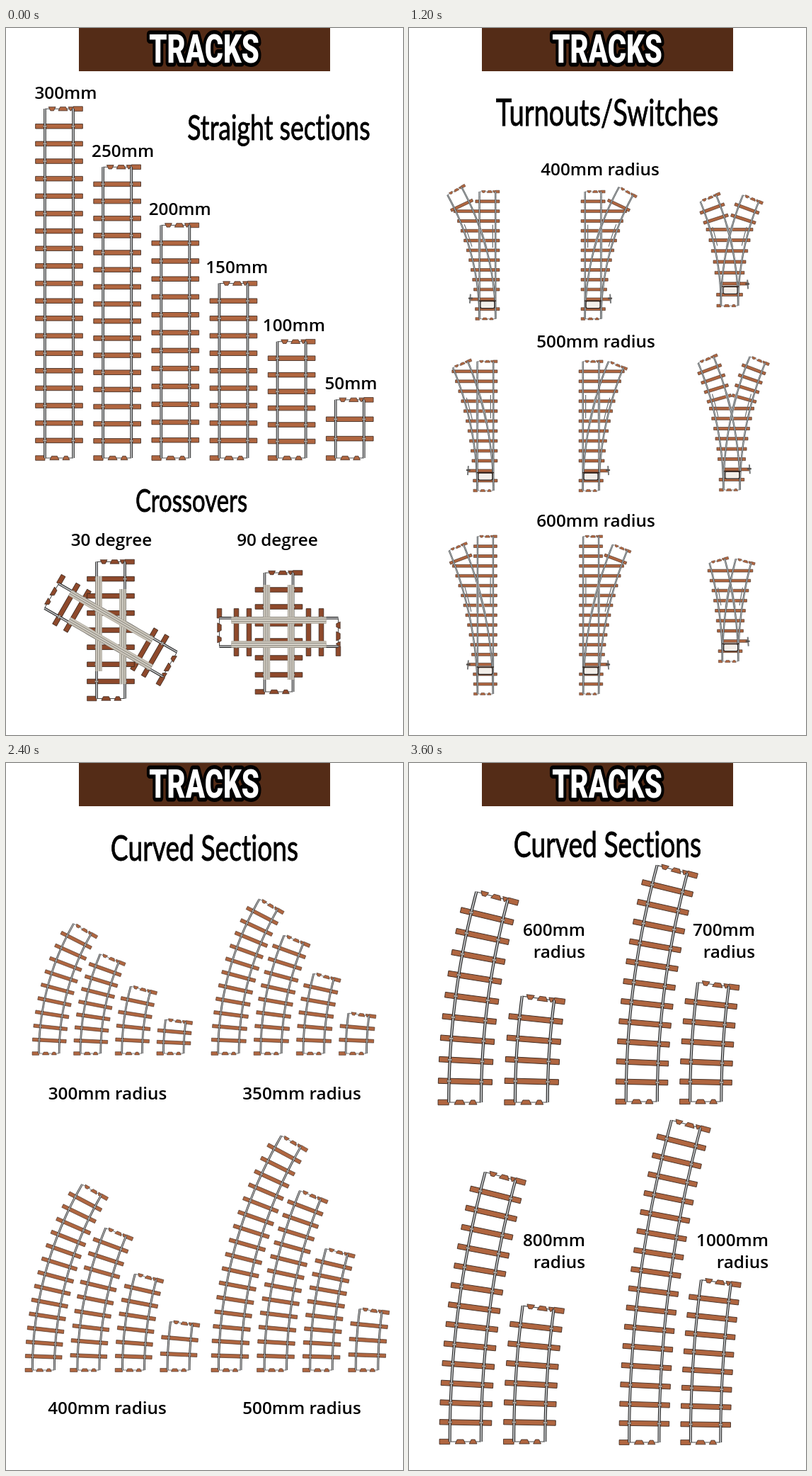
Animation, 561 px wide and 998 px high, one loop 4800 ms. Source, as an HTML page:

```html
<!DOCTYPE html>
<html lang="en">
<head>
<meta charset="utf-8">
<title>Tracks</title>
<style>
html, body { margin: 0; width: 100%; height: 100%; overflow: hidden; background: #fff; }
svg { display: block; width: 100%; height: 100%; }
text { font-variant-ligatures: none; }
.label { font: 600 24.3px "Open Sans", "Noto Sans", sans-serif; }
.head { font-family: Lato, sans-serif; text-anchor: middle; stroke: #000; stroke-width: 0.9px; }
.title { font: 900 55px Roboto, sans-serif; text-anchor: middle; fill: #fff;
  stroke: #000; stroke-width: 11px; stroke-linejoin: round; paint-order: stroke; }
</style>
</head>
<body>
<svg id="stage" viewBox="0 0 561 998" preserveAspectRatio="none"></svg>
<script>
const NS = "http://www.w3.org/2000/svg";
const PAGE_MS = 1200;
const NARROW = 0.73;
// Track sizes in millimetres; "s" below is always pixels per millimetre.
const PITCH = 15, SLEEPER = 20.3, SHORT_SLEEPER = 18.3, RAIL = 12.2, STEP = 50;
const WOOD = "#b06640", DARK_WOOD = "#8e492b";
const stage = document.getElementById("stage");
const rad = degrees => degrees * Math.PI / 180;

function add(parent, tag, attrs, text) {
  const node = document.createElementNS(NS, tag);
  for (const key in attrs) node.setAttribute(key, attrs[key]);
  if (text) node.textContent = text;
  parent.appendChild(node);
  return node;
}

const pts = list => list.map(p => p[0].toFixed(2) + "," + p[1].toFixed(2)).join(" ");

function line(parent, list, color, width) {
  add(parent, "polyline", { points: pts(list), fill: "none", stroke: color, "stroke-width": width });
}

function shape(parent, list, fill, width) {
  add(parent, "polygon", { points: pts(list), fill, stroke: "#39271e", "stroke-width": width });
}

function label(parent, x, y, text, anchor = "middle") {
  add(parent, "text", { x, y, class: "label", "text-anchor": anchor }, text);
}

function heading(parent, x, y, size, text) {
  add(parent, "text", {
    class: "head", "font-size": size, transform: `translate(${x} ${y}) scale(${NARROW} 1)`
  }, text);
}

// A line of the given length that leaves (x, y) upwards and turns evenly.
function route(x, y, length, turn) {
  const at = (d, off, along = 0) => {
    const a = turn * d / length, sin = Math.sin(a), cos = Math.cos(a);
    const px = turn ? x + length / turn * (1 - cos) : x;
    const py = turn ? y - length / turn * sin : y - d;
    return [px + off * cos + along * sin, py + off * sin - along * cos];
  };
  const box = (d, a, b, h) => [at(d, a, h), at(d, b, h), at(d, b, -h), at(d, a, -h)];
  const run = (off, from = 0, to = 1) =>
    Array.from({ length: 25 }, (_, i) => at(length * (from + (to - from) * i / 24), off));
  return { at, box, run, length, turn };
}

function ending(parent, path, top, half, s, fill) {
  const d = top ? path.length : 0, side = top ? 1 : -1, w = 0.45 * s;
  const wedge = (a, b, flip) => {
    const inset = 1.6 * s, h = flip * 1.65 * s;
    shape(parent, [
      path.at(d, a * s, h), path.at(d, b * s, h),
      path.at(d, b * s - inset, -h), path.at(d, a * s + inset, -h)
    ], fill, w);
  };
  line(parent, [path.at(d, -RAIL * s), path.at(d, RAIL * s)], "#4a4a4a", 0.6 * s);
  shape(parent, path.box(d, side * RAIL * s, side * half, 2 * s), fill, w);
  if (top) {
    wedge(-9, -3, 1);
    wedge(-0.6, 7.3, -1);
    wedge(8, 12, 1);
  } else {
    wedge(-8, 0, -1);
    wedge(3, 9, -1);
  }
}

// Sleepers spread evenly, as close to the pitch as fits.
function spread(length, s) {
  const n = Math.round(length / s / PITCH);
  return Array.from({ length: n - 1 }, (_, i) => length * (i + 1) / n);
}

function track(parent, path, s, fill = WOOD, spots = spread(path.length, s)) {
  const half = SLEEPER * s;
  for (const d of spots) shape(parent, path.box(d, -half, half, 2 * s), fill, 0.5 * s);
  for (const top of [false, true]) ending(parent, path, top, half, s, fill);
  for (const off of [-RAIL * s, RAIL * s]) {
    line(parent, path.run(off), "#2c2c2c", 2.25 * s);
    line(parent, path.run(off), "#c4c6c8", s);
    for (const d of spots)
      shape(parent, path.box(d, off - 1.6 * s, off + 1.6 * s, 0.7 * s), "#b9b5af", 0.25 * s);
  }
}

// A family of curves side by side, longest first; x is the left edge.
function curves(parent, x, y, radius, s, angles) {
  angles.forEach((angle, i) => {
    const turn = rad(angle);
    track(parent, route(x + (SLEEPER + i * STEP) * s, y, radius * s * turn, turn), s);
  });
}

function motor(parent, x, y, lever) {
  add(parent, "rect", {
    x: x - 10, y: y + 3, width: 20, height: 10, rx: 2,
    fill: "#f2eee9", stroke: "#2b2523", "stroke-width": 1.3
  });
  line(parent, [[x - 12, y + 2.6], [x + 12, y + 2.6]], "#33231b", 1.5);
  const lx = x + lever * 24;
  line(parent, [[lx, y - 7], [lx + lever, y + 6]], "#77797a", 2);
  line(parent, [[lx - 3, y - 1], [lx + 3, y - 1]], "#4d4a48", 2);
}

// Two routes sharing a toe; sleepers are joined until the routes part.
function turnout(parent, left, right, s, lever, motorTie = 2) {
  const half = SHORT_SLEEPER * s, g = RAIL * s, h = 2.1 * s;
  const main = left.turn ? right : left, both = [left, right];
  spread(main.length, s).forEach((d, i) => {
    const [lx] = left.at(d, 0), [rx] = right.at(d, 0), [, y] = main.at(d, 0);
    if (rx - lx < 2 * half) {
      const shift = i + 1 === motorTie ? lever * 7 : 0;
      const a = lx - half + shift, b = rx + half + shift;
      shape(parent, [[a, y - h], [b, y - h], [b, y + h], [a, y + h]], WOOD, 0.6);
    } else {
      for (const p of both)
        if (d < p.length - 5 * s) shape(parent, p.box(d, -half, half, h), WOOD, 0.6);
    }
  });
  for (const p of both) ending(parent, p, true, half, s, WOOD);
  ending(parent, main, false, half, s, WOOD);

  for (const p of both) {
    const inner = p === left ? g : -g;
    line(parent, p.run(inner, 0.52, 0.72), "#c9cccd", 3.6);
    line(parent, p.run(-inner * 0.66, 0.56, 0.74), "#6d7072", 1.2);
    for (const off of [-g, g]) {
      line(parent, p.run(off), "#4b4e50", 2.4);
      line(parent, p.run(off), "#bcc2c4", 1);
    }
  }
  const [mx, my] = main.at(motorTie * PITCH * s, 0);
  motor(parent, mx, my, lever);
}

function turnoutPair(parent, x, y, radius, angle, straight, s, motorTie) {
  const turn = rad(angle);
  for (const dir of [-1, 1]) {
    const cx = x + dir * 74.6;
    const ahead = route(cx, y, straight * s, 0);
    const branch = route(cx, y, radius * s * turn, dir * turn);
    turnout(parent, ...(dir < 0 ? [branch, ahead] : [ahead, branch]), s, dir, motorTie);
  }
}

function wye(parent, x, y, radius, angle, s) {
  const turn = rad(angle), length = radius * s * turn;
  turnout(parent, route(x, y, length, -turn), route(x, y, length, turn), s, 1);
}

// Cast rails of a crossing, lengthwise on one of its two tracks.
function castings(parent, x, y, shift) {
  for (const side of [-1, 1]) {
    const bar = [-67, 67].map(d => [x + side * 17, y + d + side * shift]);
    line(parent, bar, "#99948a", 9.4);
    line(parent, bar, "#c9c4b9", 8.4);
    line(parent, bar, "#858178", 3.6);
    line(parent, bar, "#d6d2c9", 1.9);
  }
}

function crossing(parent, x, y, length, angle, shift, s) {
  const path = route(x, y + length / 2, length, 0);
  const turned = add(parent, "g", { transform: `rotate(${angle} ${x} ${y})` });
  const nearEnds = [24, 42, length - 42, length - 24];
  track(turned, path, s, DARK_WOOD, nearEnds);
  const upright = add(parent, "g", {});
  track(upright, path, s, DARK_WOOD);
  castings(upright, x, y, shift);
  castings(add(parent, "g", { transform: `rotate(${angle} ${x} ${y})` }), x, y, -shift);
}

function straightPage(p) {
  const s = 1.643;
  heading(p, 385.5, 158, 48.8, "Straight sections");
  for (let i = 0; i < 6; i++) {
    const size = 300 - 50 * i, length = size * s;
    track(p, route(75 + i * STEP * s, 607, length, 0), s);
    label(p, 84.5 + i * 80.6, 592.5 - length, size + "mm");
  }
  heading(p, 262, 683, 45, "Crossovers");
  label(p, 149, 731, "30 degree");
  label(p, 383.5, 731, "90 degree");
  crossing(p, 148, 850, 193, 120, 9, s);
  crossing(p, 385.5, 853, 168, 90, 0, s);
}

function turnoutPage(p) {
  heading(p, 280, 138, 52.3, "Turnouts/Switches");
  label(p, 270, 208, "400mm radius");
  turnoutPair(p, 185.5, 410.5, 400, 29, 193, 0.93);
  wye(p, 453, 392, 400, 22.5, 0.99);
  label(p, 264, 451, "500mm radius");
  turnoutPair(p, 182.5, 653, 500, 22.5, 196, 0.93);
  wye(p, 456, 652, 500, 22.5, 0.96);
  label(p, 264, 704, "600mm radius");
  turnoutPair(p, 182.5, 940, 600, 22.5, 247, 0.9, 3);
  wye(p, 454, 894, 600, 15, 0.913);
}

function tightPage(p) {
  const angles = [30, 22.5, 15, 7.5];
  heading(p, 280.5, 138, 51, "Curved Sections");
  curves(p, 37, 410, 300, 1.173, angles);
  curves(p, 290, 410, 350, 1.203, angles);
  curves(p, 27, 857, 400, 1.272, angles);
  curves(p, 290, 857, 500, 1.292, angles);
  label(p, 143.5, 475, "300mm radius");
  label(p, 418, 475, "350mm radius");
  label(p, 143, 919, "400mm radius");
  label(p, 418, 919, "500mm radius");
}

function widePage(p) {
  const angles = [15, 7.5];
  heading(p, 280.5, 133, 51, "Curved Sections");
  const family = (x, y, radius, s, lx, ly) => {
    curves(p, x, y, radius, s, angles);
    label(p, lx, ly, radius + "mm", "end");
    label(p, lx, ly + 31, "radius", "end");
  };
  family(41, 479, 600, 1.876, 249, 244);
  family(292, 478, 700, 1.81, 489, 244);
  family(43, 958, 800, 1.81, 249, 682);
  family(297, 959, 1000, 1.736, 508, 682);
}

add(stage, "rect", { width: 561, height: 998, fill: "#fff" });
add(stage, "rect", { x: 103, y: 0, width: 355, height: 61, fill: "#542c17" });
add(stage, "text", { class: "title", transform: `translate(280 49) scale(${NARROW} 1)` }, "TRACKS");

const pages = [straightPage, turnoutPage, tightPage, widePage].map(draw => {
  const page = add(stage, "g", {});
  draw(page);
  return page;
});

function show(ms) {
  const current = Math.floor(ms / PAGE_MS) % pages.length;
  pages.forEach((page, i) => page.setAttribute("display", i === current ? "inline" : "none"));
}

const start = performance.now();
function tick() {
  show(performance.now() - start);
  requestAnimationFrame(tick);
}
tick();
</script>
</body>
</html>
```
